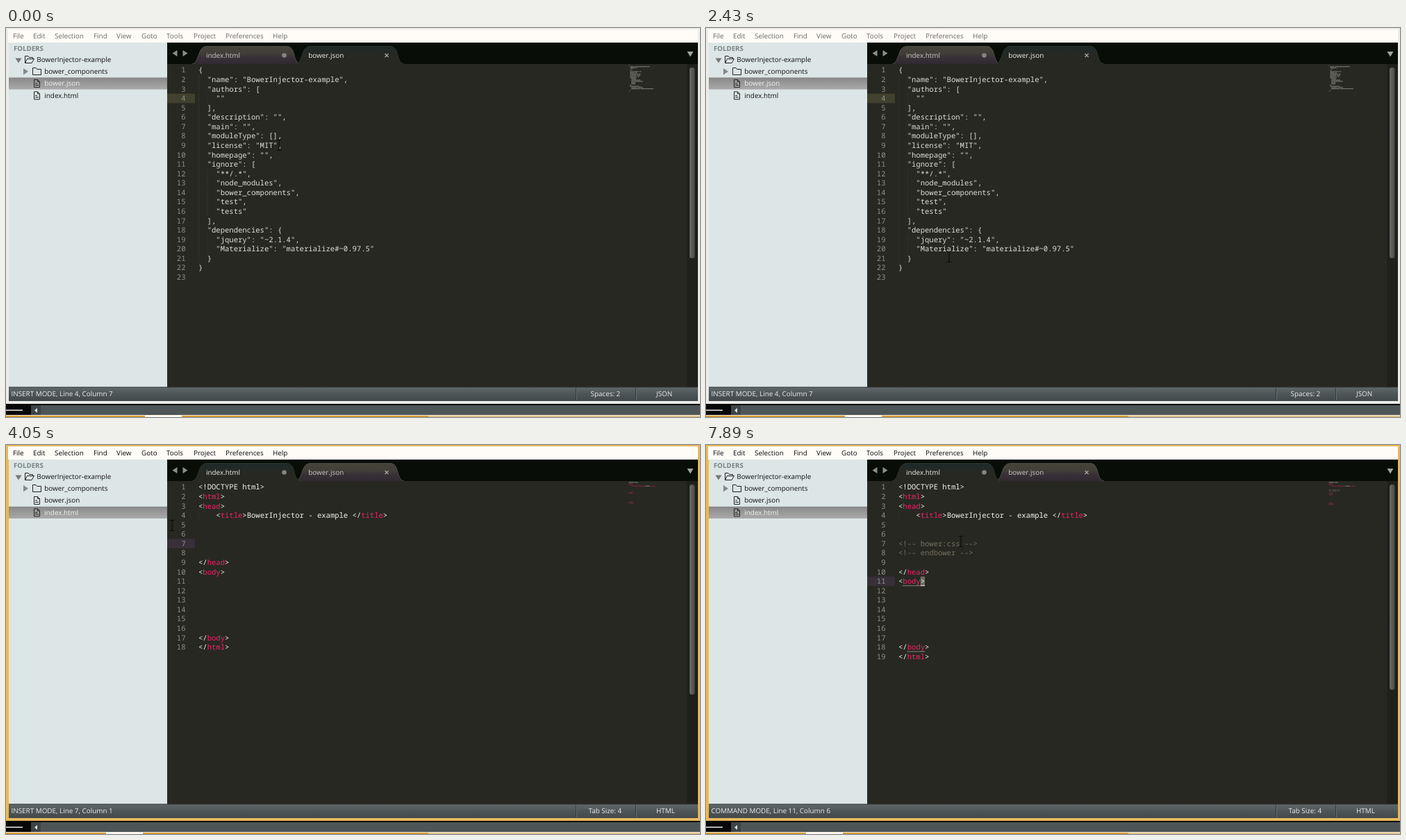
An HTML page for the animation above (8000 ms loop, 999x561 px).

```html
<!DOCTYPE html>
<html lang="en">
<head>
<meta charset="utf-8">
<title>Editor demo</title>
<style>
html, body { margin: 0; width: 100%; height: 100%; overflow: hidden; background: #000; }
svg { display: block; width: 100vw; height: 100vh; }
text { font: 9.9px "Open Sans", "Noto Sans", sans-serif; white-space: pre; text-rendering: geometricPrecision; }
.code { font: 10.55px "Noto Sans Mono", "DejaVu Sans Mono", monospace; }
.end { text-anchor: end; }
.bold { font-weight: 700; font-size: 9.7px; }
.tag { fill: #f0236d; }
</style>
</head>
<body>
<svg viewBox="0 0 999 561">
  <defs>
    <linearGradient id="row" x2="0" y2="1"><stop stop-color="#888"/><stop offset="1" stop-color="#aaa"/></linearGradient>
    <linearGradient id="bar" x2="0" y2="1"><stop stop-color="#60686a"/><stop offset=".5" stop-color="#4d5557"/><stop offset="1" stop-color="#42494b"/></linearGradient>
    <linearGradient id="front" x2="0" y2="1"><stop stop-color="#1d2a29"/><stop offset=".6" stop-color="#282822"/></linearGradient>
    <linearGradient id="back" x2="0" y2="1"><stop stop-color="#45443a"/><stop offset=".45" stop-color="#403d37"/><stop offset=".6" stop-color="#393138"/><stop offset="1" stop-color="#302a30"/></linearGradient>
    <linearGradient id="thumb"><stop stop-color="#6b6b69"/><stop offset="1" stop-color="#4a4a48"/></linearGradient>
  </defs>
  <g id="scene"></g>
  <path id="arrow" d="M0 0V14.6L3.4 11.5 5.8 17 8.1 16 5.7 10.6H10.2Z" fill="#fff" stroke="#111" stroke-width=".9"/>
  <path id="beam" d="M-3.5 -7.5H-1L0 -6.7 1 -7.5H3.5M0 -6.7V6.7M-3.5 7.5H-1L0 6.7 1 7.5H3.5" fill="none" stroke="#0b0b09" stroke-width="1.1"/>
</svg>
<script>
(() => {
const LOOP = 8000, LEFT = 277, CHAR = 6.33, LINE = 13.57;
const $ = id => document.getElementById(id);

const json = `{
  "name": "BowerInjector-example",
  "authors": [
    ""
  ],
  "description": "",
  "main": "",
  "moduleType": [],
  "license": "MIT",
  "homepage": "",
  "ignore": [
    "**/.*",
    "node_modules",
    "bower_components",
    "test",
    "tests"
  ],
  "dependencies": {
    "jquery": "~2.1.4",
    "Materialize": "materialize#~0.97.5"
  }
}
`.split('\n');

const menu = [['File', 10], ['Edit', 39], ['Selection', 70], ['Find', 126], ['View', 159], ['Goto', 195],
  ['Tools', 231], ['Project', 270], ['Preferences', 316], ['Help', 384]];
const word = 'bower_css';
const keyTimes = [5600, 5710, 5830, 6030, 6130, 6220, 6550, 6710, 6940];

// time, mode, line, column
const carets = [[0, 'INSERT', 4, 7], [3720, 'INSERT', 7, 1], [7070, 'INSERT', 8, 18], [7570, 'COMMAND', 8, 18],
  [7610, 'COMMAND', 8, 17], [7650, 'COMMAND', 9, 1], [7690, 'COMMAND', 10, 7], [7890, 'COMMAND', 11, 6]];

// time, x, y of the pointer
const path = [[60, 393, 169], [250, 290, 146], [450, 150, 112], [600, 82, 89], [720, 64, 82], [840, 72, 79],
  [960, 149, 120], [1200, 250, 205], [1450, 338, 295], [1660, 370, 335], [1900, 340, 308], [2100, 303, 306],
  [2300, 326, 324], [2430, 350, 330], [2500, 349, 329], [2760, 275, 248], [3040, 180, 158], [3310, 126, 108],
  [3490, 101, 93], [3720, 101, 93], [3960, 190, 108], [4200, 320, 130], [4440, 385, 139], [4740, 385, 139],
  [4770, 377, 139], [4900, 377, 139], [5110, 367, 139]];

const esc = s => s.replace(/&/g, '&amp;').replace(/</g, '&lt;');
const rect = (x, y, w, h, fill, more = '') =>
  `<rect x="${x}" y="${y}" width="${w}" height="${h}" fill="${fill}" ${more}/>`;
const shape = (d, fill, stroke = 'none', more = '') => `<path d="${d}" fill="${fill}" stroke="${stroke}" ${more}/>`;
const label = (x, y, s, fill, cls = '') => `<text x="${x}" y="${y}" fill="${fill}" class="${cls}">${s}</text>`;
const lineTop = n => 54 + (n - 1) * LINE;
const column = c => LEFT + (c - 1) * CHAR;

function htmlLines(typed, expanded) {
  const middle = expanded ? ['<!-- bower:css -->', '<!-- endbower -->'] : [word.slice(0, typed)];
  return ['<!DOCTYPE html>', '<html>', '<head>', '    <title>BowerInjector - example </title>', '', '',
    ...middle, '', '</head>', '<body>', '', '', '', '', '', '', '</body>', '</html>'];
}

function stateAt(t) {
  const [, mode, line, col] = carets.filter(c => t >= c[0]).pop();
  const typed = keyTimes.filter(k => t >= k).length;
  return {
    active: t >= 3520, html: t >= 3720, typed, expanded: t >= 7070, mode, line,
    col: line == 7 ? typed + 1 : col,
    caret: t >= 4960 && t < 5210 || t >= 5600 && t < 7570,
    block: t >= 7570
  };
}

function chrome({ active }) {
  const edge = active ? '#e7b95c' : '#ebebe8';
  let s = rect(0, 0, 999, 543, edge) + rect(3, 2, 993, 19, '#fffcf8');
  for (const [name, x] of menu) s += label(x, 15.4, name, active ? '#0c0c0c' : '#6c6a67');
  return s + rect(0, 542, 999, 17, '#080808') + rect(0, 550.5, 24, 1.5, '#e8e8e8')
    + rect(36, 544, 963, 14, '#4d5557') + rect(36, 544, 14, 14, '#3d4446') + shape('M45 548V555L41 551.5Z', '#ddd')
    + rect(0, 558, 999, 1, '#f3ead8') + rect(0, 559, 608, 2, '#d59a35') + rect(608, 559, 391, 2, '#dfc48b')
    + rect(active ? 144 : 200, 559, 53, 2, '#fff');
}

function sidebar({ html }) {
  const picked = html ? 97.4 : 80;
  const ink = y => y == picked ? '#f2f2f2' : '#111';
  const file = y => shape(`M40.5 ${y - 5.5}H45.5L48.5 ${y - 2.5}V${y + 5.5}H40.5ZM45.5 ${y - 5.5}V${y - 2.5}H48.5M42 ${y}H45M42 ${y + 2.5}H47`,
    'none', '#222');
  return rect(4, 21, 228, 497, '#dde6e6') + rect(4, picked - 8.6, 228, 17.2, 'url(#row)')
    + label(11, 33.4, 'FOLDERS', '#7b8383', 'bold')
    + shape('M13.5 43.5H22.5L18 50.5Z', '#777') + shape('M25 58V67.5L32 62.7Z', '#858989')
    + shape('M27.5 50.5V40.5H32L33.5 42.5H38.5V44.5H30.5L27.5 50.5H37L40.5 44.5H38', 'none', '#222')
    + shape('M38.5 67.5V57.5H43L44.5 59.5H50.5V67.5Z', 'none', '#222')
    + label(44.3, 49, 'BowerInjector-example', '#111') + label(55.3, 66.3, 'bower_components', '#111')
    + file(80) + file(97.4)
    + label(55.3, 83.4, 'bower.json', ink(80)) + label(55.3, 100.8, 'index.html', ink(97.4));
}

function tabs({ html }) {
  const tab = (x, front) => shape(
    `M${x} 52C${x + 11} 50 ${x + 7} 26.5 ${x + 21} 26.5H${x + 136}C${x + 150} 26.5 ${x + 144} 50 ${x + 156} 52`,
    `url(#${front ? 'front' : 'back'})`, front ? '#343a36' : '#5b5950', 'stroke-width=".8"');
  const order = html ? tab(417, false) + tab(268, true) : tab(268, false) + tab(417, true);
  return rect(232, 21, 764, 31, '#080e07') + order
    + shape('M246.5 32V41L239.5 36.5ZM254.5 32V41L261.5 36.5Z', '#8c8f8a') + shape('M980.5 34H989.5L985 41.5Z', '#a2a59f')
    + label(288, 43, 'index.html', html ? '#ecece6' : '#c9c8c2') + label(435.3, 43, 'bower.json', html ? '#c9c8c2' : '#ecece6')
    + '<circle cx="400.5" cy="39.5" r="3.3" fill="#85847d"/>'
    + shape('M545.5 37L550.5 42M550.5 37L545.5 42', 'none', '#a5a59f', 'stroke-width="1.3"');
}

function minimap(lines, html) {
  let s = '';
  lines.forEach((text, i) => {
    for (const m of text.matchAll(/\S+/g)) {
      const fill = text.startsWith('<!--') ? '#75715e' : html && i && m[0].includes('<') ? '#c32560' : '#c8c8c0';
      s += rect(896.5 + m.index * .886, 53.4 + i * 1.77, m[0].length * .886, 1.1, fill, 'opacity=".5"');
    }
  });
  return s;
}

function editor(st) {
  const { html, line, col } = st;
  const lines = html ? htmlLines(st.typed, st.expanded) : json;
  const thumbEnd = html ? st.expanded ? 353 : 360 : 332;
  let s = rect(232, 52, 764, 466, '#282822') + rect(980.5, 52, 15.5, 466, '#1f1f1b')
    + rect(984, 57, 7.5, thumbEnd - 57, 'url(#thumb)', 'rx="3.5"')
    + rect(232, lineTop(line), 40, LINE, html ? '#373038' : '#41412f');
  if (st.block) s += rect(column(col), lineTop(line), CHAR, LINE, '#6b6b5e');

  const guide = (c, from, to) => shape(`M${column(c) + .5} ${lineTop(from)}V${lineTop(to + 1)}`, 'none', '#46463e',
    'stroke-dasharray="1 1" stroke-width=".7"');
  s += html ? guide(1, 4, 4) : guide(1, 2, 21) + guide(3, 4, 4) + guide(3, 12, 16) + guide(3, 19, 20);

  lines.forEach((text, i) => {
    const y = lineTop(i + 1) + 10.4;
    const comment = text.startsWith('<!--');
    const body = esc(text).replace(/(&lt;\/?)(\w+)>/g, '$1<tspan class="tag">$2</tspan>>');
    s += label(258.5, y, i + 1, '#8f908a', 'code end');
    if (text) s += label(LEFT, y, body, comment ? '#75715e' : html ? '#f4f4ee' : '#dfdfd8', 'code');
  });

  const match = st.block && { 10: 'head', 11: 'body' }[line];
  if (match) {
    lines.forEach((text, i) => {
      const at = text.indexOf(match + '>');
      if (at > 0) s += shape(`M${column(at + 1)} ${lineTop(i + 1) + 13.2}h${4 * CHAR}`, 'none', '#ddd', 'stroke-dasharray="1 1"');
    });
    s += rect(column(col), lineTop(line) + 12.6, CHAR, 1, '#eee');
  }
  if (st.caret) s += rect(column(col) - .5, lineTop(line), 1.1, LINE, '#f8f8f0');
  return s + minimap(lines, html);
}

function statusBar({ html, mode, line, col }) {
  const ink = '#ececec';
  const split = x => rect(x, 519, 1, 18, '#343a3c') + rect(x + 1, 519, 1, 18, '#667073');
  return rect(4, 518, 992, 20, 'url(#bar)') + rect(4, 517.5, 992, 1, '#34393a') + split(820) + split(906)
    + label(7.5, 531.3, `${mode} MODE, Line ${line}, Column ${col}`, ink)
    + label(html ? 838.5 : 841.5, 531.3, html ? 'Tab Size: 4' : 'Spaces: 2', ink)
    + label(936, 531.3, html ? 'HTML' : 'JSON', ink);
}

function pointerAt(t) {
  const i = path.findIndex(p => p[0] > t);
  if (i < 1) return path[i ? path.length - 1 : 0].slice(1);
  const [a, b] = [path[i - 1], path[i]];
  const k = (t - a[0]) / (b[0] - a[0]);
  return [a[1] + (b[1] - a[1]) * k, a[2] + (b[2] - a[2]) * k];
}

let shown, start;
function draw(now) {
  start ??= now;
  const t = Math.round(now - start) % LOOP;
  const st = stateAt(t), key = JSON.stringify(st);
  if (key != shown) {
    $('scene').innerHTML = [chrome, sidebar, tabs, editor, statusBar].map(part => part(st)).join('');
    shown = key;
  }
  const [x, y] = pointerAt(t);
  const overText = x > 232;
  for (const [id, on] of [['beam', overText], ['arrow', !overText]]) {
    $(id).setAttribute('transform', `translate(${Math.round(x)} ${Math.round(y)})`);
    $(id).setAttribute('visibility', on ? 'visible' : 'hidden');
  }
  requestAnimationFrame(draw);
}
requestAnimationFrame(draw);
})();
</script>
</body>
</html>
```
